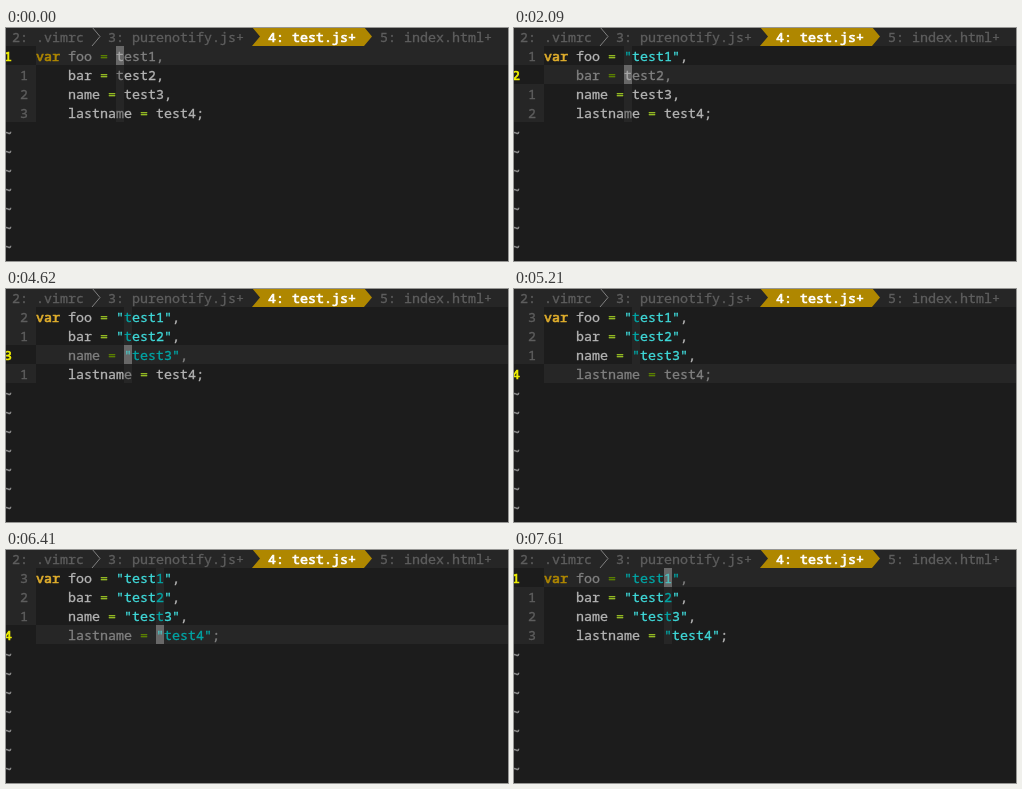
Recreate the animation shown at these times as an HTML page. Size 502 by 233 pixels, loop 8000 ms.

```html
<!DOCTYPE html>
<html>
<head>
<meta charset="utf-8">
<style>
  html, body { margin: 0; width: 100%; height: 100%; overflow: hidden; background: #1c1c1c; }
  svg { display: block; }
  text {
    font: 13.3333px "Noto Sans Mono", "DejaVu Sans Mono", monospace;
    white-space: pre;
    stroke-width: 0.3;
  }
  .bold { stroke-width: 0.7; }
</style>
</head>
<body>
<svg id="stage" width="502" height="233" viewBox="0 0 502 233"></svg>
<script>
const LOOP = 8000, CELL = 8, LINE = 19, TOP = 18, LEFT = 30;
const BG = '#1c1c1c', PANEL = '#262626', GOLD = '#af8700', MUTED = '#5e5e5e';

// Each token kind has a normal colour and a dimmed one for the cursor's row and column.
const COLORS = {
  plain: ['#b4b4b4', '#808080'],
  keyword: ['#e0ae2c', GOLD],
  operator: ['#9bc424', '#5f8700'],
  string: ['#3fd9d9', '#00a5a5'],
};

const PREFIXES = ['var foo = ', '    bar = ', '    name = ', '    lastname = '];

// start time, cursor row, cursor column, number of quoted values, cursor visible
const STATES = [
  [0, 0, 10, 0, true],
  [750, 0, 10, 0, false],
  [1350, 0, 10, 1, true],
  [1940, 0, 10, 1, false],
  [2090, 1, 10, 1, true],
  [3290, 1, 10, 2, true],
  [3730, 2, 10, 2, true],
  [4030, 2, 11, 2, true],
  [4620, 2, 11, 3, true],
  [5070, 3, 11, 3, true],
  [5210, 3, 11, 3, false],
  [5360, 3, 13, 3, true],
  [5660, 3, 15, 3, true],
  [6410, 3, 15, 4, true],
  [7310, 2, 15, 4, true],
  [7460, 1, 15, 4, true],
  [7610, 0, 15, 4, true],
];

const rect = (x, y, w, h, fill, opacity = 1) =>
  `<rect x="${x}" y="${y}" width="${w}" height="${h}" fill="${fill}" opacity="${opacity}"/>`;
const label = (x, y, str, color, bold) =>
  `<text x="${x}" y="${y}" fill="${color}" stroke="${color}"${bold ? ' class="bold"' : ''}>${str}</text>`;
const rowTop = row => TOP + row * LINE;
const baseline = row => rowTop(row) + 15;

function tabBar() {
  return rect(0, 0, 502, TOP, PANEL) +
    label(6, 14, '2: .vimrc', MUTED) +
    '<path d="M86-1L94 8.5L86 18" fill="none" stroke="#808080"/>' +
    label(102, 14, '3: purenotify.js+', MUTED) +
    `<path d="M246-1H358L366 8.5L358 18H246L254 8.5Z" fill="${GOLD}"/>` +
    label(262, 14, '4: test.js+', '#ffffff', true) +
    label(374, 14, '5: index.html+', MUTED);
}

function emptyRows() {
  let out = '';
  for (let row = 4; row < 11; row++) out += label(-2, baseline(row) + 1, '~', '#8c8c8c', true);
  return out;
}

function lineText(row, quoted) {
  const quote = row < quoted ? '"' : '';
  return PREFIXES[row] + quote + 'test' + (row + 1) + quote + (row < 3 ? ',' : ';');
}

function kindOf(token) {
  if (token === 'var') return 'keyword';
  if (token === '=') return 'operator';
  return token[0] === '"' ? 'string' : 'plain';
}

function codeLine(row, [, curRow, curCol, quoted]) {
  let col = 0, out = '';
  for (const token of lineText(row, quoted).match(/"[^"]*"|\w+|\s+|./g)) {
    const kind = kindOf(token);
    for (const char of token) {
      const dim = row === curRow || col === curCol;
      if (char !== ' ') {
        out += label(LEFT + col * CELL, baseline(row), char, COLORS[kind][+dim], kind === 'keyword');
      }
      col++;
    }
  }
  return out;
}

function gutter(row, curRow) {
  return row === curRow
    ? label(-2, baseline(row), row + 1, '#f0f000', true)
    : rect(0, rowTop(row), LEFT, LINE, PANEL) +
      label(14, baseline(row), Math.abs(row - curRow), MUTED);
}

function editor(state) {
  const [, curRow, curCol, , visible] = state;
  const x = LEFT + curCol * CELL;
  let out = rect(LEFT, rowTop(curRow), 502 - LEFT, LINE, PANEL) +
    rect(x, TOP, CELL, 4 * LINE, PANEL);
  for (let row = 0; row < 4; row++) out += gutter(row, curRow) + codeLine(row, state);
  if (visible) out += rect(x, rowTop(curRow), CELL, LINE, '#ffffff', 0.3);
  return out;
}

const stage = document.getElementById('stage');
stage.innerHTML = rect(0, 0, 502, 233, BG) + tabBar() + emptyRows() + '<g id="editor"></g>';
const pane = document.getElementById('editor');
let shown = null;

function render(now) {
  const time = now % LOOP;
  const state = STATES.filter(s => s[0] <= time).pop();
  if (state !== shown) {
    pane.innerHTML = editor(state);
    shown = state;
  }
}

function tick() {
  render(performance.now());
  requestAnimationFrame(tick);
}
tick();
</script>
</body>
</html>
```
